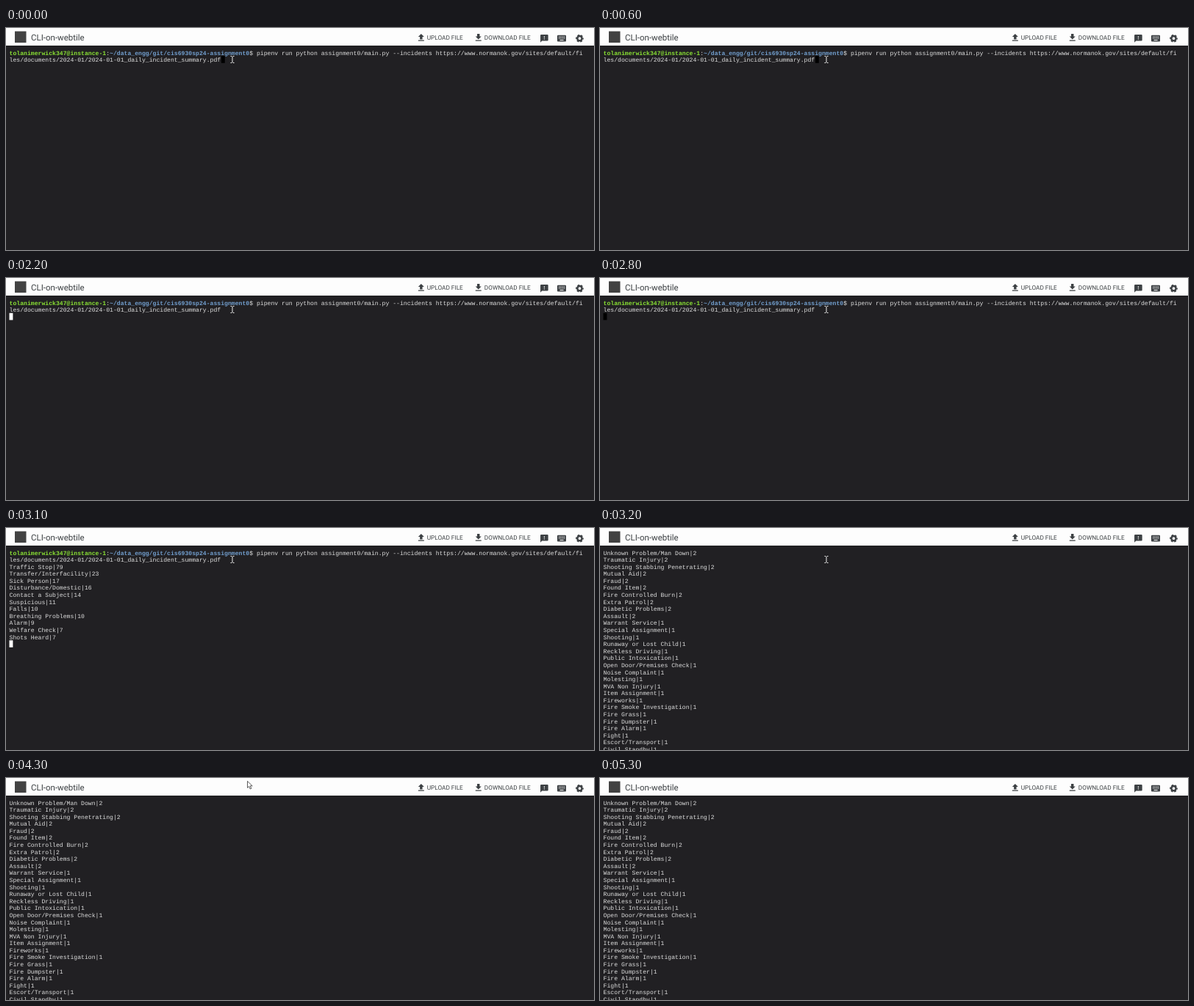
Recreate the animation shown at these times as an HTML page. Size 800 by 303 pixels, loop 5.4 s.

```html
<!DOCTYPE html>
<html lang="en">
<head>
<meta charset="utf-8">
<title>Terminal session</title>
<style>
  html, body { margin: 0; width: 100%; height: 100%; overflow: hidden; background: #212023; }
  svg { display: block; }
  text { text-rendering: geometricPrecision; white-space: pre; }
  .term { font: 8.145px "Liberation Mono", "Courier New", monospace; fill: #dedede; }
  .user { fill: #8ae234; font-weight: bold; }
  .path { fill: #729fcf; font-weight: bold; }
  .ui { font-family: Roboto, sans-serif; fill: #3c4043; }
  .button { font-size: 8.25px; }
</style>
</head>
<body>
<svg width="800" height="303" viewBox="0 0 800 303">
  <rect width="800" height="303" fill="#212023"/>
  <rect width="800" height="24" fill="#fdfdfd"/>
  <g class="ui">
    <rect x="12" y="4.5" width="15.5" height="15.5" fill="#424242"/>
    <text x="34" y="17" font-size="11.5">CLI-on-webtile</text>
    <path transform="translate(558 6.3) scale(.57)" d="M5 20h14v-2H5zM5 10h4v6h6v-6h4l-7-7z"/>
    <text class="button" x="572.7" y="15.6">UPLOAD FILE</text>
    <path transform="translate(635.9 6.3) scale(.57)" d="M19 9h-4V3H9v6H5l7 7zM5 18v2h14v-2z"/>
    <text class="button" x="650.8" y="15.6">DOWNLOAD FILE</text>
    <path transform="translate(726 8) scale(.53)" fill-rule="evenodd"
      d="M4 2h16q2 0 2 2v12q0 2-2 2H6l-4 4V4q0-2 2-2zM11 6v4h2V6zM11 12v2h2v-2z"/>
    <rect x="750" y="9.7" width="12" height="8.7" rx="1"/>
    <path d="M752 12h8.5M752 14h8.5" stroke="#fdfdfd" stroke-width="1.1" stroke-dasharray="1.1 .7"/>
    <path d="M753.6 16.5h5" stroke="#fdfdfd" stroke-width="1"/>
    <g fill="none" stroke="#3c4043">
      <circle cx="780.5" cy="14.2" r="3.1" stroke-width="2.5"/>
      <circle cx="780.5" cy="14.2" r="4.6" stroke-width="1.5" stroke-dasharray="2.81 2.01" stroke-dashoffset="1.4"/>
    </g>
  </g>
  <g id="command" class="term"></g>
  <g id="firstLines" class="term"></g>
  <g id="lastLines" class="term"></g>
  <rect id="block" width="4.9" height="9.6"/>
  <path id="beam" fill="none" stroke="#eee" stroke-width="1"
    d="M305.5 38.5h1.5l1 1l1-1h1.5M308 39.5v7M305.5 47.5h1.5l1-1l1 1h1.5"/>
  <path id="arrow" fill="#fff" stroke="#333" stroke-width=".8" d="M0 0v9l2.2-1.9 1.5 3.6 1.6-.7-1.5-3.5h2.9z"/>
</svg>
<script>
const LOOP = 5400, ENTER = 1000, PRINT = 3100, FLUSH = 3200, BLINK = 600;
const LEFT = 4.5, TOP = 29, ROW = 9.59, CHAR = 4.888;
const $ = id => document.getElementById(id);

const command = [
  '<tspan class="user">tolanimerwick347@instance-1</tspan>:' +
  '<tspan class="path">~/data_engg/git/cis6930sp24-assignment0</tspan>$ ' +
  'pipenv run python assignment0/main.py --incidents https://www.normanok.gov/sites/default/fi',
  'les/documents/2024-01/2024-01-01_daily_incident_summary.pdf'
];
const firstLines = `Traffic Stop|79
Transfer/Interfacility|23
Sick Person|17
Disturbance/Domestic|16
Contact a Subject|14
Suspicious|11
Falls|10
Breathing Problems|10
Alarm|9
Welfare Check|7
Shots Heard|7`.split('\n');
const lastLines = `Unknown Problem/Man Down|2
Traumatic Injury|2
Shooting Stabbing Penetrating|2
Mutual Aid|2
Fraud|2
Found Item|2
Fire Controlled Burn|2
Extra Patrol|2
Diabetic Problems|2
Assault|2
Warrant Service|1
Special Assignment|1
Shooting|1
Runaway or Lost Child|1
Reckless Driving|1
Public Intoxication|1
Open Door/Premises Check|1
Noise Complaint|1
Molesting|1
MVA Non Injury|1
Item Assignment|1
Fireworks|1
Fire Smoke Investigation|1
Fire Grass|1
Fire Dumpster|1
Fire Alarm|1
Fight|1
Escort/Transport|1
Civil Standby|1`.split('\n');

function print(id, lines, firstRow = 0) {
  $(id).innerHTML = lines.map((line, i) =>
    `<text x="${LEFT}" y="${TOP + 7.5 + (firstRow + i) * ROW}">${line}</text>`).join('');
}
print('command', command);
print('firstLines', firstLines, 2);
print('lastLines', lastLines);

const show = (id, on) => $(id).style.display = on ? '' : 'none';

function placeBlock(col, row, lit) {
  $('block').setAttribute('x', LEFT + col * CHAR);
  $('block').setAttribute('y', TOP - 0.4 + row * ROW);
  $('block').setAttribute('fill', lit ? '#fff' : '#000');
}

function draw() {
  const t = performance.now() % LOOP;
  show('command', t < FLUSH);
  show('firstLines', t >= PRINT && t < FLUSH);
  show('lastLines', t >= FLUSH);

  show('block', t < FLUSH);
  if (t < ENTER) placeBlock(command[1].length, 1, false);
  else if (t < PRINT) placeBlock(0, 2, Math.floor((t - ENTER) / BLINK) % 2 === 0);
  else placeBlock(0, 2 + firstLines.length, true);

  // The pointer leaves the terminal and exits through the top edge.
  show('beam', t < 4200);
  show('arrow', t >= 4200 && t < 4400);
  $('arrow').setAttribute('transform', t < 4300 ? 'translate(322 12.5)' : 'translate(328.5 4.3)');
  requestAnimationFrame(draw);
}
draw();
</script>
</body>
</html>
```
